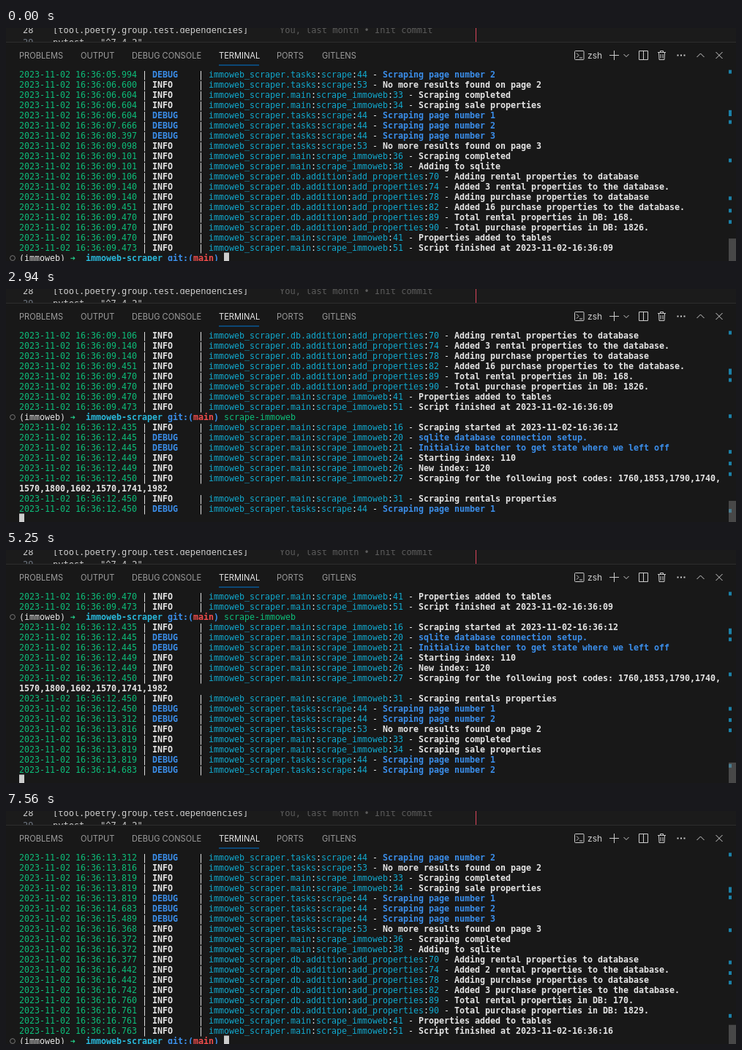
Write an HTML page that moves like this. It is 998x320 px and loops after 8.4 s.

```html
<!DOCTYPE html>
<html lang="en">
<head>
<meta charset="utf-8">
<title>Scraper terminal</title>
<style>
  html, body { margin: 0; width: 100%; height: 100%; overflow: hidden; background: #181818; }
  svg { display: block; width: 998px; height: 320px; }
  text { white-space: pre; }
  .editor { font: 12px "DejaVu Sans Mono", monospace; }
  .tabs { font: 11.1px Inter, sans-serif; fill: #9d9d9d; }
  .term { font: 11.63px "DejaVu Sans Mono", monospace; fill: #e5e5e5; }
  .icons { fill: none; stroke: #ccc; stroke-width: 1; }
  .bold { font-weight: bold; }
</style>
</head>
<body>
<svg viewBox="0 0 998 320">
  <rect width="998" height="320" fill="#181818"/>
  <g class="editor">
    <rect width="998" height="19" fill="#1b1b1b"/>
    <text x="23" y="7" fill="#ccc">28</text>
    <text x="64" y="7" fill="#ccc">[tool.poetry.group.test.dependencies]</text>
    <text x="374" y="7" fill="#5c5c5c">You, last month • Init commit</text>
    <text x="23" y="24" fill="#6e7681">29</text>
    <text x="64" y="24" fill="#ccc">pytest = "^7.4.2"</text>
    <rect x="642" width="1" height="19" fill="#d8455c"/>
    <rect y="19" width="998" height="301" fill="#181818"/>
    <rect y="19" width="998" height="1" fill="#2e2e2e"/>
  </g>
  <g class="tabs">
    <text x="18" y="41.5">PROBLEMS</text>
    <text x="102" y="41.5">OUTPUT</text>
    <text x="172" y="41.5">DEBUG CONSOLE</text>
    <text x="291" y="41.5" fill="#e7e7e7">TERMINAL</text>
    <text x="370" y="41.5">PORTS</text>
    <text x="432" y="41.5">GITLENS</text>
    <rect x="291" y="50.5" width="55" height="1" fill="#0078d4"/>
    <text x="795" y="41.5" fill="#ccc" font-size="12">zsh</text>
  </g>
  <g class="icons">
    <rect x="777.5" y="31.5" width="12.5" height="12" rx="1"/>
    <path d="M780 34.5l3 3-3 3M784 41h4"/>
    <path d="M825 37.5h13M831.5 31v13M844.5 36l3.5 3.5 3.5-3.5"/>
    <path d="M865.5 31.5h12v12h-12zM871.5 31.5v12"/>
    <path d="M891 33.5h11M894.5 33.5v-2h4v2M892.5 33.5l.5 10h7l.5-10M895 36v5.5M898 36v5.5"/>
    <path d="M944.5 40l5-5 5 5M970.5 33l9 9M979.5 33l-9 9"/>
    <path d="M917.5 37.5h2M922 37.5h2M926.5 37.5h2" stroke-width="2"/>
  </g>
  <g id="ruler"></g>
  <g id="screen" class="term"></g>
</svg>
<script>
const LOOP = 8400, ENTER = 2170, TYPED = 1540, RULER_LAG = 70;
const LEFT = 18, TOP = 57, COL = 7, ROW = 14, ROWS = 19, COLUMNS = 137;
const PANEL_HEIGHT = 263, SCROLLBACK = 162;
const WHITE = '#e5e5e5', GREEN = '#0dbc79', CYAN = '#11a8cd', BLUE = '#3b8eea';
const SOURCES = {
  t: ['tasks', 'scrape'],
  m: ['main', 'scrape_immoweb'],
  d: ['db.addition', 'add_properties']
};

// Each entry: seconds, level, source and line, message
const history = `05.994 D t44 Scraping page number 2
06.600 I t53 No more results found on page 2
06.604 I m33 Scraping completed
06.604 I m34 Scraping sale properties
06.604 D t44 Scraping page number 1
07.666 D t44 Scraping page number 2
08.397 D t44 Scraping page number 3
09.098 I t53 No more results found on page 3
09.101 I m36 Scraping completed
09.101 I m38 Adding to sqlite
09.106 I d70 Adding rental properties to database
09.140 I d74 Added 3 rental properties to the database.
09.140 I d78 Adding purchase properties to database
09.451 I d82 Added 16 purchase properties to the database.
09.470 I d89 Total rental properties in DB: 168.
09.470 I d90 Total purchase properties in DB: 1826.
09.470 I m41 Properties added to tables
09.473 I m51 Script finished at 2023-11-02-16:36:09`.split('\n');

const run = `12.435 I m16 Scraping started at 2023-11-02-16:36:12
12.445 D m20 sqlite database connection setup.
12.445 D m21 Initialize batcher to get state where we left off
12.449 I m24 Starting index: 110
12.449 I m26 New index: 120
12.450 I m27 Scraping for the following post codes: 1760,1853,1790,1740,1570,1800,1602,1570,1741,1982
12.450 I m31 Scraping rentals properties
12.450 D t44 Scraping page number 1
13.312 D t44 Scraping page number 2
13.816 I t53 No more results found on page 2
13.819 I m33 Scraping completed
13.819 I m34 Scraping sale properties
13.819 D t44 Scraping page number 1
14.683 D t44 Scraping page number 2
15.489 D t44 Scraping page number 3
16.368 I t53 No more results found on page 3
16.372 I m36 Scraping completed
16.372 I m38 Adding to sqlite
16.377 I d70 Adding rental properties to database
16.442 I d74 Added 2 rental properties to the database.
16.442 I d78 Adding purchase properties to database
16.742 I d82 Added 3 purchase properties to the database.
16.760 I d89 Total rental properties in DB: 170.
16.761 I d90 Total purchase properties in DB: 1829.
16.761 I m41 Properties added to tables
16.763 I m51 Script finished at 2023-11-02-16:36:16`.split('\n');

// Time and number of run lines printed by then; one past the end is the new prompt
const OUTPUT = [[ENTER, 0], [2870, 8], [3780, 9], [4270, 10], [4340, 13], [5180, 14],
  [6090, 15], [7000, 19], [7070, 21], [7350, 22], [7420, 26], [7490, 27]];
const MARKS = [1, 35, 37, 43.5, 76, 108, 118.5, 128];

const printedAt = time => OUTPUT.reduce((n, [at, lines]) => time >= at ? lines : n, -1);

// A row is a list of [text, colour, bold] spans
function logRows(entry) {
  const [, seconds, level, key, line, message] = entry.match(/^(\S+) (.) (.)(\d+) (.*)$/);
  const [module, func] = SOURCES[key];
  const tint = level === 'D' ? BLUE : WHITE;
  const spans = [
    [`2023-11-02 16:36:${seconds}`, GREEN], [' | ', WHITE],
    [(level === 'D' ? 'DEBUG' : 'INFO').padEnd(8), tint, true], [' | ', WHITE],
    [`immoweb_scraper.${module}`, CYAN], [':', WHITE],
    [func, CYAN], [':', WHITE], [line, CYAN], [' - ', WHITE]
  ];
  const room = COLUMNS - spans.reduce((sum, [text]) => sum + text.length, 0);
  spans.push([message.slice(0, room), tint, true]);
  return message.length > room ? [spans, [[message.slice(room), tint, true]]] : [spans];
}

function promptRow(command) {
  const row = [['(immoweb) ', WHITE], ['➜  ', '#23d18b', true],
    ['immoweb-scraper ', '#29b8db', true], ['git:(', BLUE, true],
    ['main', '#f14c4c', true], [') ', BLUE, true], [command, GREEN]];
  row.prompt = true;
  return row;
}

function drawRow(row, index) {
  const top = TOP + index * ROW;
  let col = 0, svg = '';
  for (const [text, fill, bold] of row) {
    const x = LEFT + col * COL;
    if (text.trim()) {
      const indent = text.length - text.trimStart().length;
      svg += `<text x="${x + indent * COL}" y="${top + 10.8}" fill="${fill}"${bold ? ' class="bold"' : ''}>${text.trim()}</text>`;
    }
    col += text.length;
  }
  if (row.prompt) svg += `<circle cx="9" cy="${top + 7}" r="3.4" fill="none" stroke="#777"/>`;
  if (index === ROWS - 1) svg += `<rect x="${LEFT + col * COL}" y="${top - 0.5}" width="7" height="14" fill="#ccc"/>`;
  return svg;
}

const runRows = n => run.slice(0, Math.max(n, 0)).flatMap(logRows);

function drawScreen(printed, typed) {
  const rows = [...history.flatMap(logRows), promptRow(typed ? 'scrape-immoweb' : ''), ...runRows(printed)];
  if (printed > run.length) rows.push(promptRow(''));
  else if (printed >= 0) rows.push([]);
  return rows.slice(-ROWS).map(drawRow).join('');
}

function drawRuler(printed) {
  const total = SCROLLBACK + (printed < 0 ? 0 : runRows(printed).length + 1);
  const thumb = PANEL_HEIGHT * ROWS / total;
  const marks = [...MARKS, ...(printed < 0 ? [] : [SCROLLBACK - 1])];
  return marks.map(line =>
    `<rect x="988" y="${TOP - 1 + line / total * PANEL_HEIGHT}" width="4" height="5" fill="#1b81a8"/>`).join('') +
    `<rect x="988" y="${320 - thumb}" width="10" height="${thumb}" fill="#797979" fill-opacity=".5"/>`;
}

const screenLayer = document.getElementById('screen');
const rulerLayer = document.getElementById('ruler');
let shown = '';

function render(time) {
  const printed = printedAt(time), typed = time >= TYPED;
  // The scrollbar trails the output, except for the Enter key
  const ruled = Math.max(printedAt(time - RULER_LAG), Math.min(printed, 0));
  const state = [printed, typed, ruled].join();
  if (state === shown) return;
  shown = state;
  screenLayer.innerHTML = drawScreen(printed, typed);
  rulerLayer.innerHTML = drawRuler(ruled);
}

const start = performance.now();
function tick() {
  render((performance.now() - start) % LOOP);
  requestAnimationFrame(tick);
}
tick();
</script>
</body>
</html>
```
